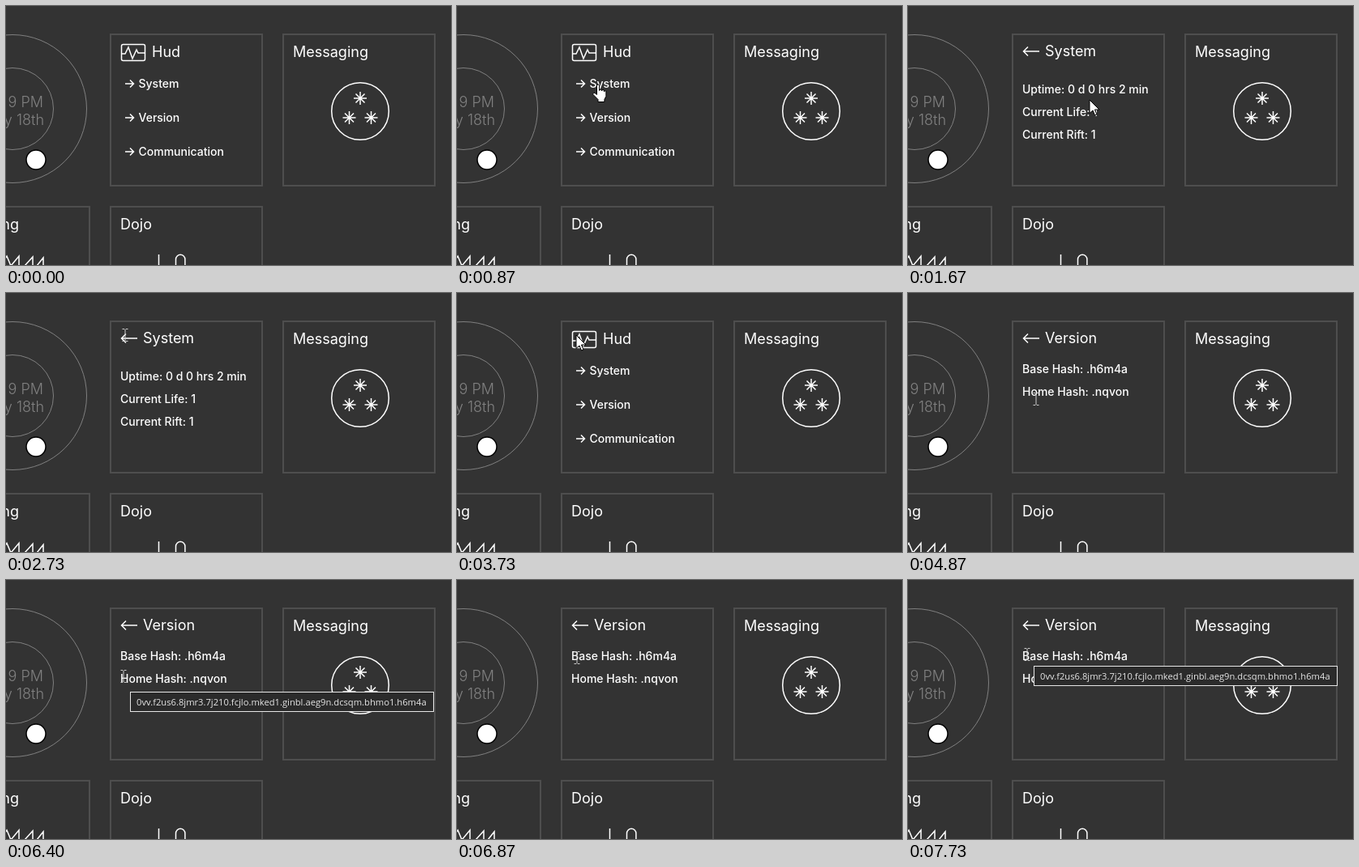
Recreate the animation shown at these times as an HTML page. Size 549 by 320 pixels, loop 8000 ms.

```html
<!DOCTYPE html>
<html lang="en">
<head>
<meta charset="utf-8">
<title>Dashboard tiles</title>
<style>
  html, body { margin: 0; width: 100%; height: 100%; overflow: hidden; background: #333; }
  svg { display: block; font: 500 14px Inter, sans-serif; fill: #fff; }
  .line { fill: none; stroke: #fff; stroke-width: 1.5; }
  .card { fill: none; stroke: #4e4e4e; stroke-width: 2; }
  .title { font-size: 18px; font-weight: 400; }
  .clock { font-size: 18px; font-weight: 300; fill: #808080; text-anchor: end; }
  .ring { fill: none; stroke: #808080; }
  .tip { font: 11.2px "Open Sans", sans-serif; fill: #e6e6e6; }
  .pointer { fill: #fff; stroke: #000; stroke-width: 1; }
</style>
</head>
<body>
<svg width="549" height="320" viewBox="0 0 549 320">
  <defs>
    <path id="star" class="line" d="M0-8V8M-8 0H8M-5.5-5.5 5.5 5.5M-5.5 5.5 5.5-5.5"/>
    <path id="next" class="line" d="M147 0h10.5m-4.5-4.5 4.5 4.5-4.5 4.5"/>
    <path id="back" class="line" d="M162 56H142.5m5.5-5.5-5.5 5.5 5.5 5.5"/>
  </defs>

  <circle class="ring" cx="8" cy="127" r="91.5"/>
  <circle class="ring" cx="8" cy="127" r="50.5"/>
  <text class="clock" x="46" y="125">9 PM</text>
  <text class="clock" x="47" y="147">y 18th</text>
  <circle cx="37" cy="190" r="12" stroke="#000" stroke-width="1.5"/>

  <rect class="card" x="129" y="35" width="187" height="187"/>
  <rect class="card" x="342" y="35" width="187" height="187"/>
  <rect class="card" x="-84" y="248" width="187" height="187"/>
  <rect class="card" x="129" y="248" width="187" height="187"/>

  <text class="title" x="354" y="63">Messaging</text>
  <circle class="line" cx="437" cy="130" r="35.3"/>
  <use href="#star" x="437" y="114"/>
  <use href="#star" x="423.5" y="138"/>
  <use href="#star" x="450.5" y="138"/>

  <text class="title" x="16" y="276" text-anchor="end">ng</text>
  <path class="line" d="M-1 312 1 309 6 321 16 309V321M23 321 33 310V321M38 321 46 311V321"/>
  <text class="title" x="141" y="276">Dojo</text>
  <path class="line" d="M188.5 307V321M209.5 321V313a5.7 5.7 0 0 1 11.4 0V321"/>

  <g id="hud">
    <rect class="line" x="142.5" y="47.5" width="29" height="20" rx="2"/>
    <path class="line" d="M143 59h4l4-8 5 14 5-11 2 4h8"/>
    <text class="title" x="180" y="63">Hud</text>
    <use href="#next" y="96"/><text x="163.5" y="101">System</text>
    <use href="#next" y="138"/><text x="163.5" y="143">Version</text>
    <use href="#next" y="180"/><text x="163.5" y="185">Communication</text>
  </g>
  <g id="system">
    <use href="#back"/><text class="title" x="169" y="62">System</text>
    <text x="141" y="108">Uptime: 0 d 0 hrs 2 min</text>
    <text x="141" y="136">Current Life: 1</text>
    <text x="141" y="164">Current Rift: 1</text>
  </g>
  <g id="version">
    <use href="#back"/><text class="title" x="169" y="62">Version</text>
    <text x="141" y="99">Base Hash: .h6m4a</text>
    <text x="141" y="127">Home Hash: .nqvon</text>
  </g>

  <g id="cursor">
    <path id="arrow" class="pointer" d="M0 0V16.5L4 13 6.5 19 9 18 6.5 12H12Z"/>
    <path id="hand" class="pointer" transform="translate(-7 -.5)" d="M5.5 13V2a1.5 1.5 0 0 1 3 0V8a1.5 1.5 0 0 1 3 0v.5a1.5 1.5 0 0 1 3 0v1a1.2 1.2 0 0 1 2.4 0V15l-2 4v3H7v-3L1 13a1.5 1.5 0 0 1 2-2Z"/>
    <path id="beam" fill="none" stroke="#ccc" d="M-3.5-7.5h2.5l1 1 1-1h2.5M0-6.5v13M-3.5 7.5h2.5l1-1 1 1h2.5"/>
  </g>

  <g id="tooltip">
    <rect x=".5" y=".5" width="374" height="24" fill="#2b2b2b" stroke="#e6e6e6"/>
    <text class="tip" x="8" y="17">0vv.f2us6.8jmr3.7j210.fcjlo.mked1.ginbl.aeg9n.dcsqm.bhmo1.h6m4a</text>
  </g>
</svg>
<script>
const LOOP = 8000, STEP = 1000 / 15;
const el = id => document.getElementById(id);
const show = (id, on) => el(id).style.display = on ? '' : 'none';
const place = (id, x, y) => el(id).setAttribute('transform', `translate(${x} ${y})`);

// time, x, y, cursor shape from that time on
const path = [
  [200, 538, 308, 'arrow'], [400, 330, 192, 'arrow'], [600, 212, 120, 'arrow'],
  [800, 175, 98, 'hand'], [867, 174, 97, 'hand'], [1200, 174, 97, 'beam'],
  [1400, 174, 97, 'beam'], [1667, 224, 116, 'arrow'], [1800, 212, 105, 'beam'],
  [1933, 180, 76, 'arrow'], [2133, 154, 57, 'arrow'], [2200, 154, 57, 'arrow'],
  [2400, 150, 54, 'beam'], [2733, 147, 52, 'beam'], [3733, 147, 52, 'arrow'],
  [3933, 147, 52, 'arrow'], [4200, 164, 128, 'arrow'], [4267, 165, 134, 'hand'],
  [4333, 165, 137, 'hand'], [4667, 165, 137, 'beam'], [4867, 158, 131, 'beam'],
  [5267, 145, 119, 'beam'], [6400, 145, 119, 'beam'], [6667, 149, 107, 'arrow'],
  [6800, 148, 98, 'beam'], [7000, 147, 92, 'beam'], [LOOP, 147, 92, 'beam']
];

function draw(now) {
  // the screen refreshes 15 times a second
  const t = Math.floor((now % LOOP + 4) / STEP) * STEP + 1;

  const panel = t < 1130 ? 'hud' : t < 3660 ? 'system' : t < 4600 ? 'hud' : 'version';
  for (const id of ['hud', 'system', 'version']) show(id, id === panel);

  show('cursor', t >= 200);
  const i = Math.max(1, path.findIndex(p => p[0] > t));
  const [t0, x0, y0, shape] = path[i - 1], [t1, x1, y1] = path[i];
  const k = Math.max(0, (t - t0) / (t1 - t0));
  place('cursor', Math.round(x0 + (x1 - x0) * k), Math.round(y0 + (y1 - y0) * k));
  for (const id of ['arrow', 'hand', 'beam']) show(id, id === shape);

  const second = t >= 7400;
  show('tooltip', second || t >= 5460 && t < 6530);
  place('tooltip', second ? 155 : 153, second ? 106 : 138);
}

const start = performance.now();
function tick() {
  draw(performance.now() - start);
  requestAnimationFrame(tick);
}
tick();
</script>
</body>
</html>
```
